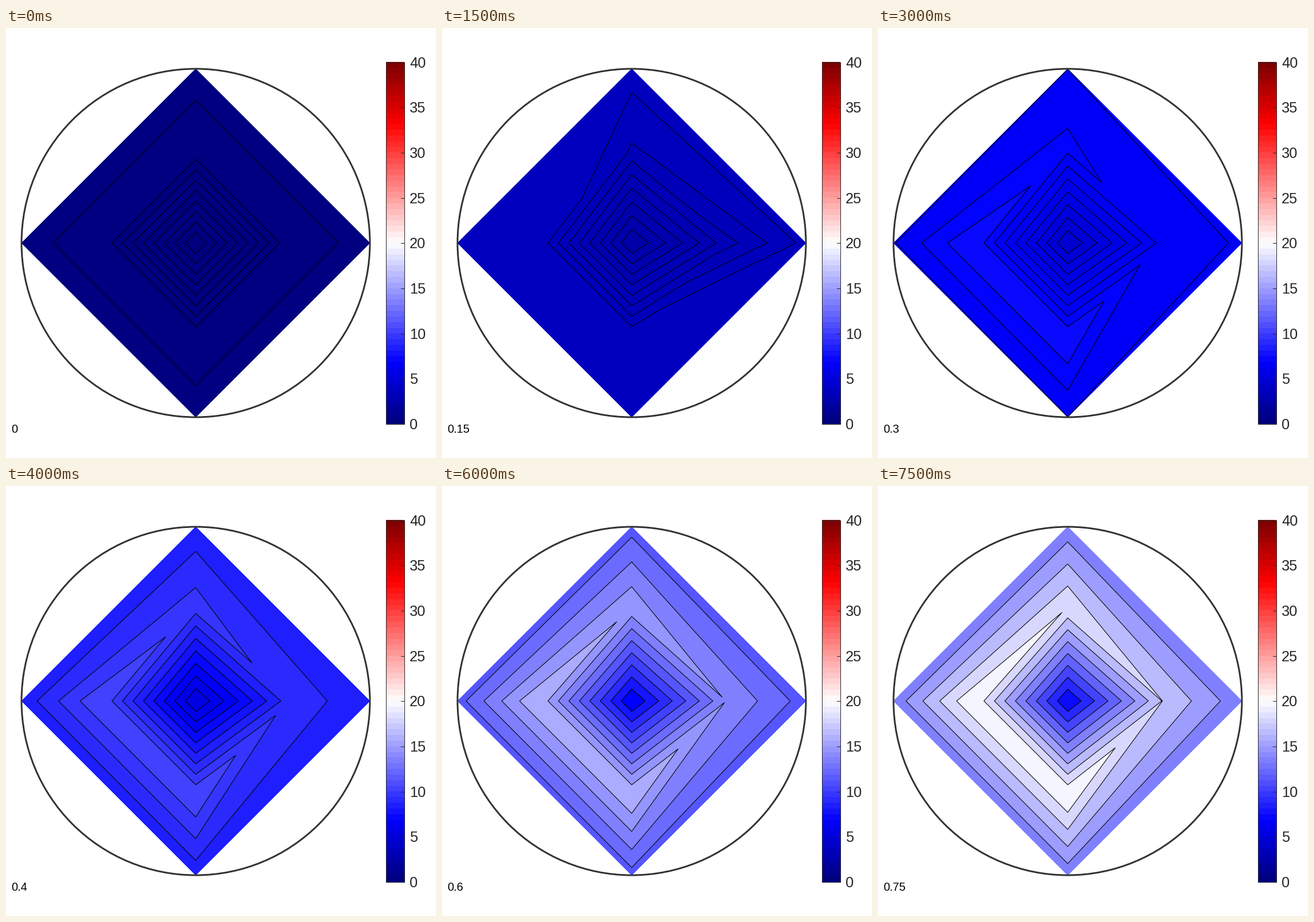
Recreate the animation shown at these times as a matplotlib script. Size 748 by 748 pixels, loop 8 s.

```python
import numpy as np
import matplotlib.pyplot as plt
from matplotlib.animation import FuncAnimation
from matplotlib.colors import LinearSegmentedColormap
from matplotlib.patches import Circle, Rectangle

SIZE, DPI = 748, 100
PX = 72 / DPI                      # points per pixel
CX, CY, R, R_MID = 330, 374, 303, 164
FRAMES, STEP = 16, 0.05
VMAX = 40
INK = "#262626"

STOPS = [(0, (0, 0, 0.5)), (1 / 6, (0, 0, 1)), (0.5, (1, 1, 1)),
         (5 / 6, (1, 0, 0)), (1, (0.5, 0, 0))]
heat = LinearSegmentedColormap.from_list("heat", STOPS, N=1024)
bar_map = LinearSegmentedColormap.from_list("bar", STOPS, N=64)

# Temperatures at the centre and hot side; the other columns are
# ninths of the way from centre to hot side.
# time, centre, hot, mid east, mid north, rim east/west, rim north/south
KEYS = np.array([
    (0.05, 0.75, 0.95, 4.80, 6.40, 11.30, 11.50),
    (0.10, 1.50, 2.10, 5.22, 6.66, 9.65, 9.82),
    (0.15, 2.20, 3.45, 5.58, 6.886, 8.34, 8.466),
    (0.25, 3.60, 6.00, 6.19, 7.22, 6.49, 6.58),
    (0.40, 5.20, 10.7, 6.64, 7.53, 5.27, 5.32),
    (0.50, 6.10, 13.6, 6.84, 7.677, 4.83, 4.89),
    (0.60, 6.70, 16.7, 6.965, 7.81, 4.52, 4.58),
    (0.75, 7.20, 21.0, 7.015, 7.935, 4.26, 4.32),
])
START = (0, 1e-3, 9, 9, 7.35, 7.35)
TIMES, VALUES = KEYS[:, 0], KEYS[:, 1:]
SLOPES = np.gradient(VALUES, TIMES, axis=0)


def state(t):
    """Cubic Hermite interpolation of the key values."""
    if t < TIMES[0] - 1e-9:
        return START
    i = min(max(np.searchsorted(TIMES, t + 1e-9) - 1, 0), len(TIMES) - 2)
    h = TIMES[i + 1] - TIMES[i]
    s = (t - TIMES[i]) / h
    return ((1 + 2 * s) * (1 - s) ** 2 * VALUES[i]
            + s * (1 - s) ** 2 * h * SLOPES[i]
            + s * s * (3 - 2 * s) * VALUES[i + 1]
            + s * s * (s - 1) * h * SLOPES[i + 1])


def field(t):
    """Temperature on the polar grid: centre, middle ring, rim."""
    centre, hot, east, north, rim_x, rim_y = state(t)
    ninths = np.array([
        [0, 0, 0, 0, 0],
        [east, north, 9, 9, east],
        [rim_x, rim_y, rim_x, rim_y, rim_x],
    ])
    return centre + (hot - centre) / 9 * ninths


radii = np.array([[0], [R_MID], [R]])
X = CX + radii * np.array([1, 0, -1, 0, 1])
Y = CY - radii * np.array([0, 1, 0, -1, 0])

fig = plt.figure(figsize=(SIZE / DPI, SIZE / DPI), dpi=DPI, facecolor="white")
ax = fig.add_axes([0, 0, 1, 1])
ax.set_xlim(0, SIZE)
ax.set_ylim(SIZE, 0)
ax.set_autoscale_on(False)
ax.axis("off")

ax.add_patch(Circle((CX, CY), R, fill=False, ec="#333333", lw=3 * PX, zorder=5))

# Colour bar
BX, BY, BW, BH = 661, 59.5, 32, 629.5
ax.imshow(np.arange(64)[::-1, None], cmap=bar_map, aspect="auto",
          extent=(BX, BX + BW, BY + BH, BY), interpolation="nearest")
ax.set_xlim(0, SIZE)
ax.set_ylim(SIZE, 0)
ax.add_patch(Rectangle((BX, BY), BW, BH, fill=False, ec=INK, lw=PX, zorder=5))
for v in range(0, VMAX + 1, 5):
    y = BY + BH * (1 - v / VMAX)
    ax.plot([BX + BW - 6, BX + BW], [y, y], color=INK, lw=PX, zorder=5)
    ax.text(702, y + 9, str(v), family="Liberation Sans", size=25.2 * PX,
            color=INK, va="baseline")

clock = ax.text(9, 704, "0", family="Liberation Sans", size=20 * PX,
                color="black", va="baseline")
drawn = []


def update(i):
    while drawn:
        drawn.pop().remove()
    z = field(i * STEP)
    levels = np.linspace(z.min(), z.max(), 10)
    for k, level in enumerate(levels[:-1]):
        low = level if k else level - 1
        drawn.append(ax.contourf(X, Y, z, [low, 1e3], antialiased=True,
                                 colors=[heat(level / VMAX)], zorder=2))
    drawn.append(ax.contour(X, Y, z, levels[1:-1], colors="black",
                            linewidths=1.05 * PX, zorder=3))
    clock.set_text(f"{i * STEP:g}")
    return [clock]


anim = FuncAnimation(fig, update, frames=FRAMES, init_func=lambda: [clock],
                     interval=500, repeat=True, repeat_delay=0, blit=False)
plt.show()
```
